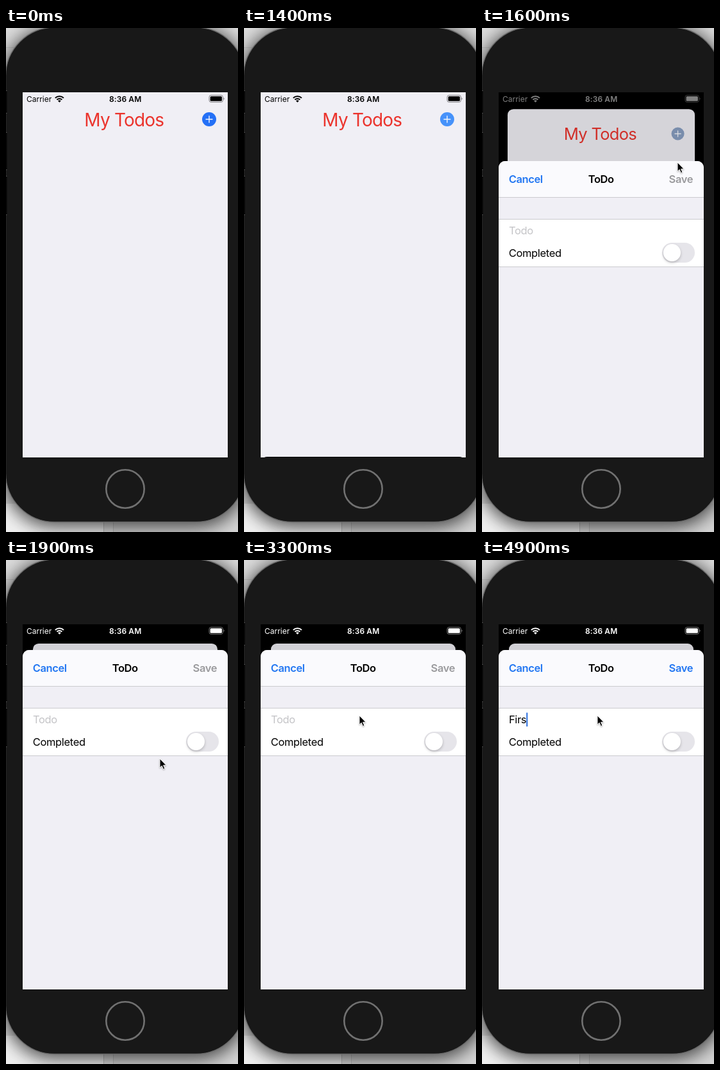
An HTML page for the animation above (5 s loop, 362x784 px).

```html
<!DOCTYPE html>
<html lang="en">
<head>
<meta charset="utf-8">
<title>My Todos</title>
<style>
  html, body { margin: 0; width: 100%; height: 100%; overflow: hidden; background: #dedede; }
  svg { display: block; width: 362px; height: 784px; font-family: Inter, Roboto, sans-serif; }
  .body { font-size: 16.5px; letter-spacing: -.36px; }
  .bold { font-weight: 600; letter-spacing: -.42px; }
  .title { font-size: 28px; letter-spacing: -.8px; }
  .status { font-size: 12px; }
  .status .bold { letter-spacing: .1px; }
  #phone { filter: drop-shadow(0 0 14px rgba(0, 0, 0, .45)) drop-shadow(0 8px 12px rgba(0, 0, 0, .4)); }
  #knob { filter: drop-shadow(0 2px 2px rgba(0, 0, 0, .22)); }
  #cursor { filter: drop-shadow(0 1px 1px rgba(0, 0, 0, .3)); }
</style>
</head>
<body>
<svg viewBox="0 0 362 784">
  <defs>
    <clipPath id="screen"><rect x="26" y="100" width="320" height="568"/></clipPath>
  </defs>

  <!-- desktop -->
  <rect width="362" height="784" fill="#dcdcdc"/>
  <path d="M0 30.5H60" stroke="#c8c8c8"/>
  <rect y="740" width="152" height="44" fill="#f0f0f0"/>
  <rect x="167" y="740" width="195" height="44" fill="#d4d4d4"/>
  <path d="M152.5 760V784M167.5 760V784" stroke="#bdbdbd"/>

  <!-- phone -->
  <rect id="phone" x="-.5" y="-1" width="373" height="769.5" rx="76" fill="#181818" stroke="#6a6a6a" stroke-width="1.3"/>
  <path d="M.5 97V133M.5 162V221M.5 230V291" stroke="#050505" stroke-width="2"/>
  <path d="M0 97.5H1.5M0 132.5H1.5M0 162.5H1.5M0 220.5H1.5M0 230.5H1.5M0 290.5H1.5" stroke="#555"/>
  <circle cx="186" cy="717" r="29.7" fill="#181818" stroke="#717171" stroke-width="2.6"/>

  <g clip-path="url(#screen)">
    <rect x="26" y="100" width="320" height="568"/>
    <g id="card">
      <rect id="page" x="26" y="100" width="320" height="640" fill="#f0eff5"/>
      <text class="title" x="122.3" y="152.6" fill="#eb342d">My Todos</text>
      <circle id="add" cx="317" cy="142" r="11"/>
      <path d="M312 142H322M317 137V147" stroke="#f4f6fb" stroke-width="1.4" stroke-linecap="round"/>
      <rect id="dim" x="26" y="100" width="320" height="640"/>
    </g>

    <g id="status" class="status">
      <text x="32" y="114.7">Carrier</text>
      <text class="bold" x="161" y="114.7">8:36 AM</text>
      <g fill="none" stroke="currentColor" stroke-width="2">
        <path d="M76.8 108.9A9.3 9.3 0 0 1 90 108.9M79.4 111.5A5.8 5.8 0 0 1 87.4 111.5"/>
        <rect x="317" y="104.6" width="21.5" height="10.8" rx="3" stroke-width="1" opacity=".45"/>
      </g>
      <path d="M83.4 115.8L81 113.3A3.5 3.5 0 0 1 85.8 113.3Z"/>
      <rect x="318.6" y="106.2" width="18.3" height="7.6" rx="1.6"/>
      <path d="M339.6 108.2A2 2 0 0 1 339.6 111.8Z" opacity=".5"/>
    </g>

    <g id="sheet" class="body">
      <rect id="base" x="26" y="140" width="320" height="600" rx="10"/>
      <path id="bar" d="M26 196V150A10 10 0 0 1 36 140H336A10 10 0 0 1 346 150V196Z" fill="#fafafd"/>
      <rect x="26" y="231" width="320" height="73" fill="#fff"/>
      <path d="M26 196.5H346M26 230.5H346M26 304.5H346" stroke="#cbcbcf"/>
      <text class="bold" x="41.8" y="174" fill="#2176f2">Cancel</text>
      <text class="bold" x="165.8" y="174">ToDo</text>
      <text class="bold" id="save" x="291.6" y="174">Save</text>
      <text id="field" x="41.9" y="254"></text>
      <rect id="caret" y="237.5" width="2" height="21.5" fill="#2b6fe0"/>
      <text x="41.8" y="288.5">Completed</text>
      <rect x="281" y="267" width="51" height="31" rx="15.5" fill="#e6e5ea"/>
      <circle id="knob" cx="296.5" cy="282.5" r="13.5" fill="#fff"/>
    </g>
  </g>

  <path id="cursor" d="M0 0V14.2L3.2 11.2L5.5 16.5L7.9 15.5L5.6 10.3H10Z" stroke="#fff" stroke-width="1" stroke-linejoin="round"/>
</svg>

<script>
const LOOP = 5000, STEP = 100;
const $ = id => document.getElementById(id);
const clamp = v => Math.min(1, Math.max(0, v));
const mix = (a, b, k) => a + (b - a) * k;
const rgb = (a, b, k) => `rgb(${a.map((v, i) => Math.round(mix(v, b[i], k)))})`;
const BLACK = [0, 0, 0], WHITE = [255, 255, 255], GREY = [240, 239, 245];

// pointer runs: [ms, x, y]; hidden between runs
const runs = [
  [[100, 150, 17], [200, 128, 80], [300, 160, 150], [400, 230, 183], [500, 300, 170], [600, 328, 150], [700, 317, 143], [1100, 317, 143]],
  [[1600, 305, 209], [1700, 293, 245], [1900, 240, 309], [2000, 220, 355], [2150, 225, 397], [2300, 262, 310],
   [2400, 288, 253], [2500, 293, 250], [2600, 281, 252], [2800, 281, 252], [2900, 265, 258], [3000, 235, 256],
   [3150, 196, 246], [3300, 180, 242], [LOOP, 180, 242]]
];
const keys = [4000, 4300, 4500, 4800], word = "Firs";

function pointer(t) {
  const run = runs.find(r => t >= r[0][0] && t <= r[r.length - 1][0]);
  if (!run) return null;
  const i = Math.max(1, run.findIndex(k => k[0] >= t));
  const [t0, x0, y0] = run[i - 1], [t1, x1, y1] = run[i];
  const k = (t - t0) / (t1 - t0);
  return [mix(x0, x1, k), mix(y0, y1, k)];
}

// critically damped spring, 0 to 1
function spring(ms, w = 17.6) {
  const x = Math.max(0, ms) / 1000 * w;
  return 1 - (1 + x) * Math.exp(-x);
}

function draw(t) {
  const p = spring(t - 1397);
  $("sheet").setAttribute("transform", `translate(0 ${Math.floor(mix(528, 0, p))})`);
  $("card").setAttribute("transform", `translate(186 ${100 + 30 * p}) scale(${1 - .1 * p}) translate(-186 -100)`);
  for (const id of ["page", "dim"]) $(id).setAttribute("rx", 10 * clamp(p * 5));
  $("dim").setAttribute("opacity", .13 * p);

  // the sheet lights up from black as it starts to rise
  $("base").setAttribute("fill", rgb(BLACK, GREY, clamp(p * 5)));
  $("bar").setAttribute("opacity", clamp(p * 5));

  const pressed = t >= 1300 && t < 1500;
  const blue = pressed ? [70, 146, 250] : [36, 112, 246];
  $("add").setAttribute("fill", rgb(blue, [152, 166, 186], p));

  const tone = rgb(BLACK, WHITE, clamp((t - 1450) / 300));
  $("status").setAttribute("fill", tone);
  $("status").setAttribute("color", tone);

  const typed = word.slice(0, keys.filter(k => t >= k).length);
  const field = $("field");
  field.textContent = typed || "Todo";
  field.setAttribute("fill", typed ? "#000" : "#c4c4c7");
  $("save").setAttribute("fill", typed ? "#2176f2" : "#9a9a9d");
  $("caret").setAttribute("x", 42 + (typed ? field.getComputedTextLength() : 0));
  $("caret").setAttribute("opacity", t >= 3600 ? 1 : 0);

  const at = pointer(t);
  $("cursor").setAttribute("visibility", at ? "visible" : "hidden");
  if (at) $("cursor").setAttribute("transform", `translate(${at})`);
}

const start = performance.now();
function tick() {
  const t = (performance.now() - start) % LOOP;
  draw(Math.floor(t / STEP) * STEP);
  requestAnimationFrame(tick);
}
tick();
</script>
</body>
</html>
```
